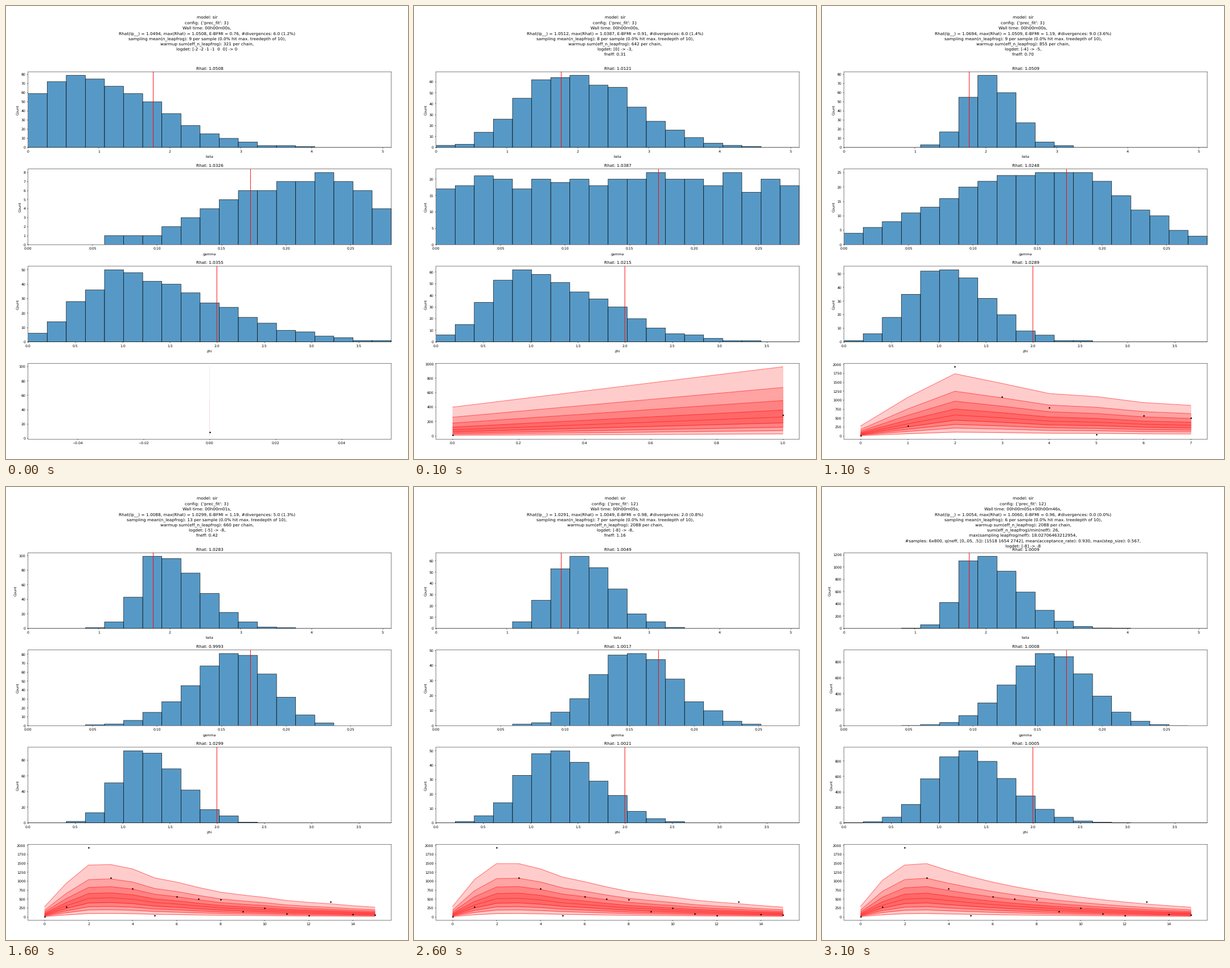
A matplotlib script that plays this animation: 706 by 794 pixels, repeating every 3600 ms.

```python
import numpy as np
import matplotlib.pyplot as plt
from matplotlib.animation import FuncAnimation

plt.rcParams.update({"font.family": "DejaVu Sans", "text.hinting": "none",
                     "path.snap": False})

W, H, DPI = 706, 794, 44.125
LEFT, RIGHT, TOP, PANEL, STEP = 38.7, 676.6, 115.2, 132.8, 170.4
LINE_Y, LINE_STEP, MAX_LINES = 22.2, 9.25, 10
BINS = 19
BAR = (0x1f / 255, 0x77 / 255, 0xb4 / 255, 0.75)
STEP_MS, LOOP_MS = 100, 3600

# name, upper x limit, true value
PARAMS = [("beta", 5.12, 1.765), ("gamma", 0.2815, 0.1724), ("phi", 3.842, 1.997)]

OBSERVED = [9, 287, 1936, 1102, 790, 42, 568, 503, 480, 152, 250, 88, 42, 430, 72, 64]


def header(prec, wall, rhat_lp, rhat_max, bfmi, div, leap, warm, *rest):
    return [
        "model: sir",
        f"config: {{'prec_fit': {prec}}}",
        f"Wall time: {wall},",
        f"Rhat(lp__) = {rhat_lp}, max(Rhat) = {rhat_max}, E-BFMI = {bfmi}, #divergences: {div}",
        f"sampling mean(n_leapfrog): {leap} per sample (0.0% hit max. treedepth of 10),",
        f"warmup sum(eff_n_leapfrog): {warm} per chain,",
        *rest]


def sample_counts(peak, mode, left, right, seed):
    """Two-sided bell over the bins with sampling noise, scaled to its peak."""
    d = np.arange(BINS) - mode
    mean = peak * np.exp(-0.5 * (d / np.where(d < 0, left, right)) ** 2)
    noise = np.random.default_rng(seed).normal(size=BINS)
    counts = np.clip(mean + 0.3 * np.sqrt(mean) * noise, 0, None)
    return np.round(counts * peak / counts.max())


def fan(n, rise, mid=0.355, spread=1.0, jitter=0.0):
    """Nine quantile curves: a rise, then a steady decay of the epidemic."""
    t = np.arange(n)
    last = len(rise) - 1
    top = np.interp(t, range(last + 1), rise) * 0.868 ** np.clip(t - last, 0, None)
    fade = np.exp(-t)
    second = top * (0.73 - 0.08 * fade)
    median = top * (mid - 0.1 * fade)
    upper = [top] + [second * (median / second) ** (k / 3) for k in range(3)]
    lower = [median * r ** spread for r in (0.755, 0.555, 0.38, 0.186)]
    wobble = 1 + jitter * np.random.default_rng(n).normal(size=n) * (t > last)
    return np.array(upper + [median] + lower) * wobble


# start ms, header, panel Rhats, (peak, mode, left, right) per histogram, quantile fan
STATES = [
    (0, header(3, "00h00m00s", "1.0494", "1.0508", "0.76", "6.0 (1.2%)", 9, 321,
               "logdet: [-2 -2 -1 -1  0  0] -> 0"),
     ("1.0508", "1.0326", "1.0355"),
     ((79, 2, 2.7, 4), (8, 15, 5, 3), (50, 4, 2, 5)),
     None),
    (100, header(3, "00h00m00s", "1.0512", "1.0387", "0.91", "6.0 (1.4%)", 8, 642,
                 "logdet: [0] -> -3,", "fneff: 0.31"),
     ("1.0121", "1.0387", "1.0215"),
     ((66, 6, 2.2, 3.5), (22, 9, 20, 20), (62, 4, 1.9, 4)),
     fan(2, (400, 960), 0.31, 1.3)),
    (600, header(3, "00h00m00s", "1.0429", "1.0324", "1.04", "7.0 (1.7%)", 8, 988,
                 "logdet: [-3] -> -4,", "fneff: 0.24"),
     ("1.0008", "1.0324", "1.0077"),
     ((91, 7.2, 1.5, 1.9), (25, 4, 4, 13), (77, 4, 1.8, 2.9)),
     fan(4, (328, 1065, 1366, 1528), 0.31, 1.3)),
    (1100, header(3, "00h00m00s", "1.0694", "1.0509", "1.19", "9.0 (3.6%)", 9, 855,
                  "logdet: [-4] -> -5,", "fneff: 0.70"),
     ("1.0509", "1.0248", "1.0289"),
     ((79, 7, 1.15, 1.4), (25, 11, 6, 3.5), (53, 4.5, 1.6, 2.4)),
     fan(8, (280, 1079, 1741, 1470), 0.35, jitter=0.03)),
    (1600, header(3, "00h00m01s", "1.0088", "1.0299", "1.19", "5.0 (1.3%)", 13, 660,
                  "logdet: [-5] -> -8,", "fneff: 0.42"),
     ("1.0283", "0.9993", "1.0299"),
     ((99, 6.3, 1, 2.1), (81, 10.6, 2.4, 1.7), (92, 5.4, 1.3, 2)),
     fan(16, (288, 951, 1453, 1468), 0.37, jitter=0.03)),
    (2100, header(6, "00h00m02s", "1.0907", "1.0060", "0.92", "8.0 (3.2%)", 7, 1494,
                  "logdet: [-8] -> -8,", "fneff: 1.00"),
     ("0.9983", "1.0060", "1.0027"),
     ((77, 6.9, 1.2, 1.5), (48, 9.3, 1.55, 2.4), (48, 6, 1.85, 2.4)),
     fan(16, (290, 1094, 1573, 1494), 0.35, jitter=0.03)),
    (2600, header(12, "00h00m05s", "1.0291", "1.0049", "0.98", "2.0 (0.8%)", 7, 2088,
                  "logdet: [-8] -> -8,", "fneff: 1.16"),
     ("1.0049", "1.0017", "1.0021"),
     ((64, 6.7, 1.2, 1.9), (48, 9.8, 2, 2.2), (50, 5.6, 1.6, 2.3)),
     fan(16, (294, 1051, 1493, 1493), jitter=0.02)),
    (3100, header(12, "00h00m05s+00h00m46s", "1.0054", "1.0060", "0.96", "0.0 (0.0%)", 6, 2088,
                  "sum(eff_n_leapfrog)/min(neff): 26,",
                  "max(sampling leapfrog/neff): 18.02706463212954,",
                  "#samples: 6x800, q(neff, [0,.05, .5]): [1518 1654 2742], "
                  "mean(acceptance_rate): 0.930, max(step_size): 0.567,",
                  "logdet: [-8] -> -8"),
     ("1.0009", "1.0008", "1.0005"),
     ((1175, 6.45, 1, 2.1), (905, 10.3, 2.15, 2), (932, 5.6, 1.6, 2.4)),
     fan(16, (296, 1030, 1453, 1493))),
]

fig = plt.figure(figsize=(W / DPI, H / DPI), dpi=DPI, facecolor="white")
axes = [fig.add_axes([LEFT / W, 1 - (TOP + i * STEP + PANEL) / H,
                      (RIGHT - LEFT) / W, PANEL / H]) for i in range(4)]
lines = [fig.text(0.5, 1 - (LINE_Y + k * LINE_STEP) / H, "", fontsize=12,
                  ha="center", va="baseline") for k in range(MAX_LINES)]


def draw_hist(ax, param, rhat, counts):
    name, xmax, truth = param
    width = xmax / BINS
    ax.bar(np.arange(BINS) * width, counts, width, align="edge",
           facecolor=BAR, edgecolor="black", linewidth=1)
    ax.axvline(truth, color="red", lw=1.5)
    ax.set(xlim=(0, xmax), ylim=(0, counts.max() * 1.05), title=f"Rhat: {rhat}")
    ax.set_xlabel(name, labelpad=5.5)
    ax.set_ylabel("Count")


def draw_fan(ax, curves):
    if curves is None:
        ax.plot([0, 0], [52, 100], color="#dcdcdc", lw=1)
        ax.plot([0, 0], [4, 52], color="#e6c3c3", lw=1)
        n = 1
        ax.set(xlim=(-0.055, 0.055), ylim=(-0.9, 104.5))
    else:
        n = curves.shape[1]
        t = np.arange(n)
        for k in range(4):
            ax.fill_between(t, curves[8 - k], curves[k], color="red", alpha=0.2, lw=1)
        for curve in curves:
            ax.plot(t, curve, color="red", alpha=0.55, lw=1.5)
        high = max(curves.max(), *OBSERVED[:n])
        ax.set(xlim=(-0.05 * (n - 1), 1.05 * (n - 1)),
               ylim=(-0.0465 * high, 1.0485 * high))
    ax.plot(range(n), OBSERVED[:n], "k.", ms=6)


def update(i):
    k = max(j for j, s in enumerate(STATES) if s[0] <= i * STEP_MS)
    _, text, rhats, shapes, curves = STATES[k]
    for ax in axes:
        ax.clear()
    for row, line in enumerate(lines):
        line.set_text(text[row] if row < len(text) else "")
    for j in range(3):
        counts = sample_counts(*shapes[j], seed=3 * k + j)
        draw_hist(axes[j], PARAMS[j], rhats[j], counts)
    draw_fan(axes[3], curves)
    return axes


anim = FuncAnimation(fig, update, frames=LOOP_MS // STEP_MS, interval=STEP_MS,
                     init_func=lambda: update(0), repeat=True, repeat_delay=0, blit=False)
plt.show()
```
